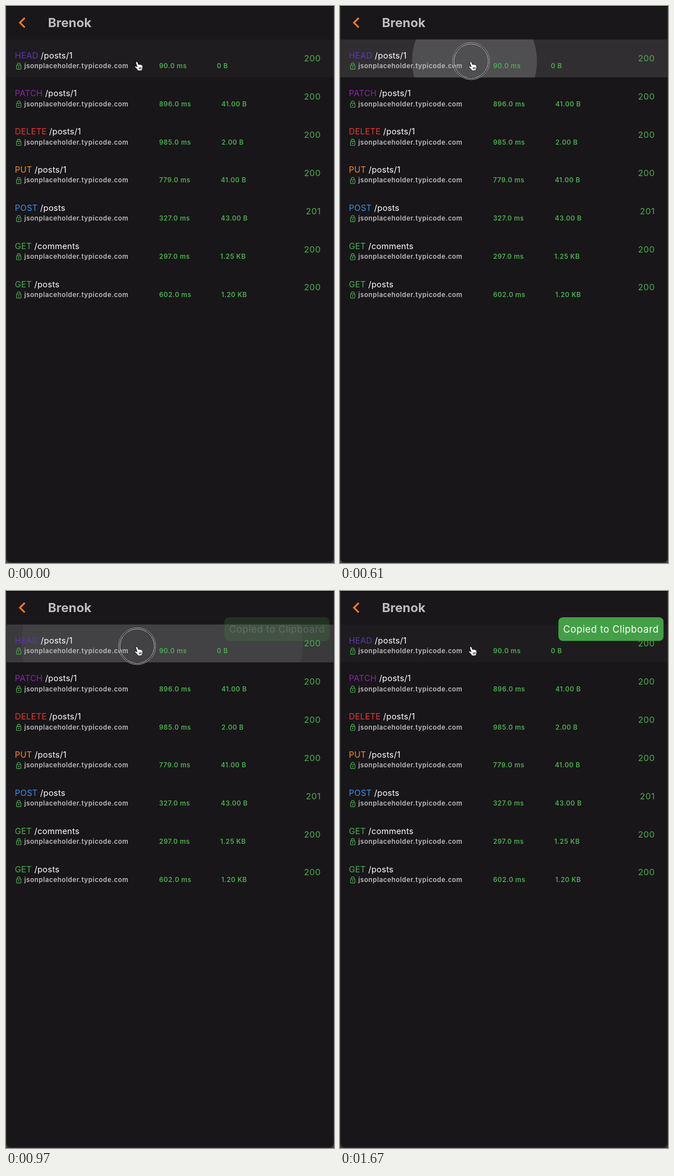
Write an HTML page that moves like this. It is 574x976 px and loops after 1.7 s.

```html
<!DOCTYPE html>
<html lang="en">
<head>
<meta charset="utf-8">
<title>Request log</title>
<style>
  html, body { margin: 0; height: 100%; overflow: hidden; background: #181619; }
  svg { display: block; width: 100vw; height: 100vh; font-family: Inter, sans-serif; }
  .title { font-size: 22px; font-weight: 700; fill: #bdbdbd; }
  .request { font-size: 14.6px; letter-spacing: .2px; }
  .detail { font-size: 11.48px; font-weight: 600; letter-spacing: .5px; }
  .status { font-size: 15px; letter-spacing: .5px; text-anchor: end; }
  .toast { font-size: 16.7px; letter-spacing: .52px; }
  .ok { fill: #4caf50; }
  .host { fill: #bdbdbd; }
  .line { fill: none; }
</style>
</head>
<body>
<svg viewBox="0 0 574 976">
  <defs>
    <clipPath id="rowClip"><rect y="58.4" width="574" height="66.8"/></clipPath>
    <g id="lock" class="line" stroke="#4caf50" stroke-width="1.1">
      <rect x="18.4" y="103.7" width="7.8" height="6.9" rx=".8"/>
      <path d="M19.8 103.7V102.2a2.5 2.5 0 0 1 5 0V103.7"/>
      <circle cx="22.3" cy="107.1" r=".6"/>
    </g>
  </defs>

  <rect width="574" height="976" fill="#181619"/>
  <rect width="574" height="58.4" fill="#19171a"/>
  <rect width="574" height="1" fill="#050505"/>
  <path d="M32.8 20.9L24.4 29.2L32.8 37.5" class="line" stroke="#f97c1c" stroke-width="3"/>
  <text x="73.5" y="37" class="title">Brenok</text>

  <g clip-path="url(#rowClip)">
    <rect y="58.4" width="574" height="66.8" fill="#1e1c1f"/>
    <rect id="highlight" y="58.4" width="574" height="66.8" fill="#ccc"/>
    <circle id="ripple" fill="#ccc"/>
  </g>
  <g id="rows"></g>

  <path d="M0 966Q0 976 9 976H0ZM574 966Q574 976 565 976H574Z" fill="#444346"/>
  <path d="M.5 1V966Q.5 975 9 975H565Q573.5 975 573.5 966V1" class="line" stroke="#343336"/>

  <g id="toast">
    <rect x="382.2" y="46" width="184" height="41.6" rx="8" fill="#43a047"/>
    <text x="390.5" y="73.2" class="toast" fill="#fff">Copied to Clipboard</text>
  </g>

  <g id="ring" class="line">
    <circle cx="229.5" cy="96.6" r="31.2" stroke="#111" stroke-width="2"/>
    <circle cx="229.5" cy="96.6" r="32.3" stroke="#ccc" stroke-width=".8"/>
    <circle cx="229.5" cy="96.6" r="30.2" stroke="#ddd" stroke-width=".9"/>
  </g>
  <g transform="translate(224.5 96)" stroke="#111" stroke-width=".9" stroke-linejoin="round">
    <path fill="#fff" d="M2.8 4C2.2 1.6 5.2 .8 6 3L7.3 6.6C8.4 5.8 9.8 6.1 10.2 7C11.3 6.3 12.4 6.8 12.7 7.7
      C13.6 7.4 14.4 8 14.5 9.2L14.6 12.5L13.3 17L7 17.5L3.5 13.2C1 11.5 .5 10 1.8 9.6C3 9.2 4 10.2 5 10.8Z"/>
    <path class="line" d="M8.3 11.5L8.9 15M10.1 11.3L10.6 14.8M11.9 11.1L12.2 14.5"/>
  </g>
</svg>

<script>
const LOOP = 1700;
const PRESS = 415, SPREAD = 506, FADE_IN = 520, LONG_PRESS = 917, RELEASE = 1270;
const ROW_PITCH = 66.83, INK_RADIUS = 294;

// method, colour, path, time, size, size x, status
const requests = [
  ['HEAD', '#5e35b1', '/posts/1', '90.0 ms', '0 B', 369, 200],
  ['PATCH', '#8e24aa', '/posts/1', '896.0 ms', '41.00 B', 377, 200],
  ['DELETE', '#e53935', '/posts/1', '985.0 ms', '2.00 B', 377, 200],
  ['PUT', '#fb8c1e', '/posts/1', '779.0 ms', '41.00 B', 376, 200],
  ['POST', '#3a8ee6', '/posts', '327.0 ms', '43.00 B', 376, 201],
  ['GET', '#4caf50', '/comments', '297.0 ms', '1.25 KB', 375, 200],
  ['GET', '#4caf50', '/posts', '602.0 ms', '1.20 KB', 376.7, 200],
];

const $ = id => document.getElementById(id);

$('rows').innerHTML = requests.map(([method, color, path, time, size, sizeX, status], i) => `
  <g transform="translate(0 ${i * ROW_PITCH})">
    <text x="15.5" y="91.6" class="request" fill="#fff"><tspan fill="${color}">${method}</tspan> ${path}</text>
    <use href="#lock"/>
    <text x="32" y="109" class="detail host">jsonplaceholder.typicode.com</text>
    <text x="268" y="109" class="detail ok">${time}</text>
    <text x="${sizeX}" y="109" class="detail ok">${size}</text>
    <text x="551" y="97.4" class="status ok">${status}</text>
  </g>`).join('');

const progress = (t, start, duration) => Math.min(1, Math.max(0, (t - start) / duration));
const mix = (a, b, k) => a + (b - a) * k;

// cubic-bezier(.25, .1, .25, 1), solved by bisection
function ease(x) {
  const bezier = (a, b, u) => 3 * a * u * (1 - u) ** 2 + 3 * b * u * u * (1 - u) + u ** 3;
  let low = 0, high = 1;
  for (let i = 0; i < 20; i++) {
    const mid = (low + high) / 2;
    if (bezier(.25, .25, mid) < x) low = mid; else high = mid;
  }
  return bezier(.1, 1, low);
}

function set(id, attributes) {
  for (const name in attributes) $(id).setAttribute(name, attributes[name]);
}

function draw(t) {
  const spread = ease(progress(t, SPREAD, 1000));
  const fade = duration => progress(t, FADE_IN, duration) * (1 - progress(t, LONG_PRESS, duration));
  set('highlight', { opacity: .22 * fade(200) });
  set('ripple', {
    cx: mix(229.5, 287, spread),
    cy: mix(97, 91.8, spread),
    r: INK_RADIUS * mix(.3, 1, spread),
    opacity: .2 * fade(75),
  });
  set('toast', { opacity: progress(t, 905, 340) });
  set('ring', { opacity: t >= PRESS && t < RELEASE ? 1 : 0 });
}

const start = performance.now();
function tick() {
  draw((performance.now() - start) % LOOP);
  requestAnimationFrame(tick);
}
tick();
</script>
</body>
</html>
```
